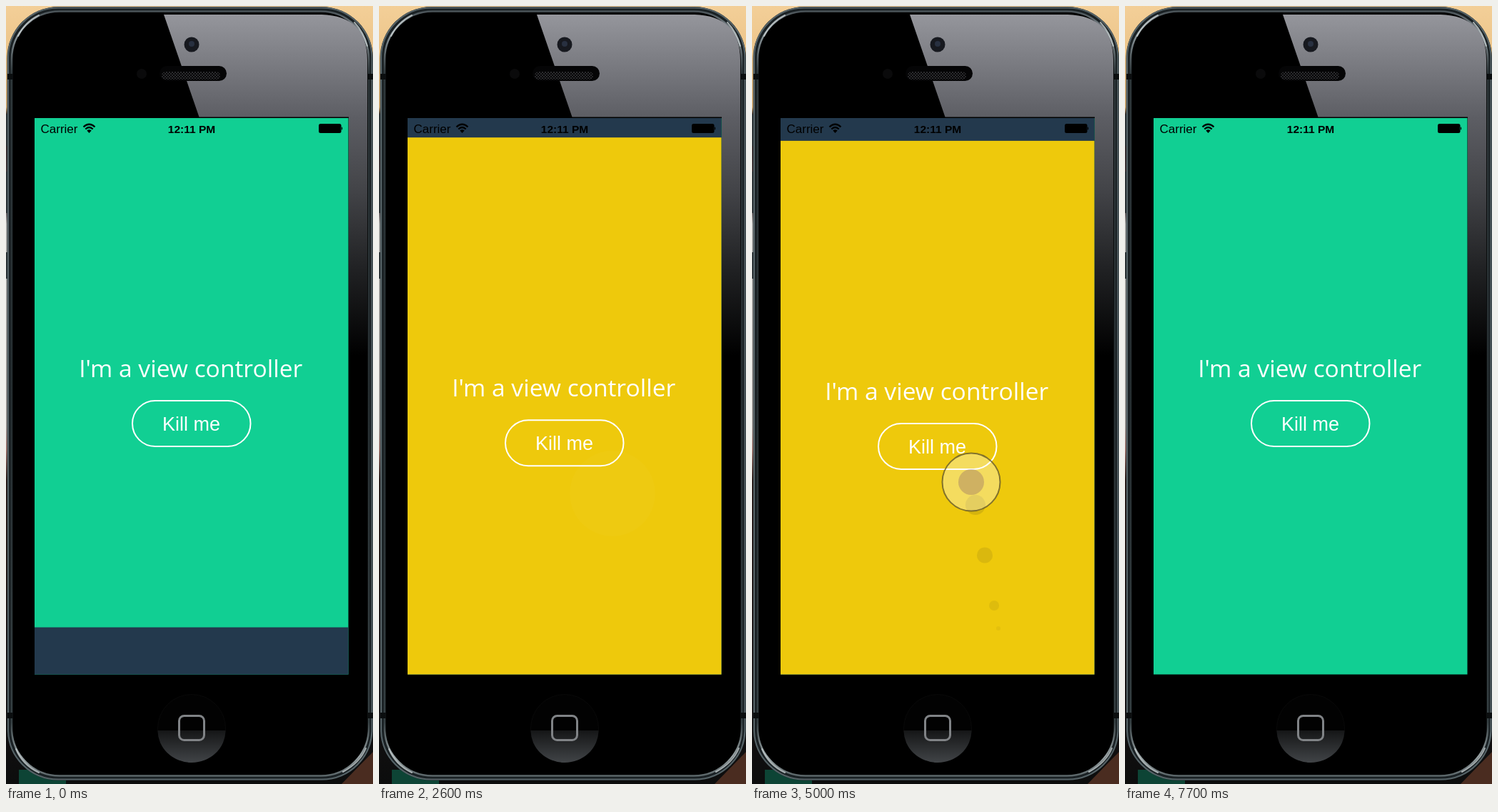
Animation, 514 px wide and 1090 px high, one loop 8 s. Source, as an HTML page:

```html
<!DOCTYPE html>
<html lang="en">
<head>
<meta charset="utf-8">
<title>Stacked view controllers</title>
<style>
  html, body { margin: 0; width: 100%; height: 100%; overflow: hidden; background: #000; }
  svg { display: block; }
  .title { font: 33.6px "Open Sans", sans-serif; fill: #fff; text-anchor: middle; }
  .label { font: 27px "Liberation Sans", Arial, sans-serif; fill: #fff; text-anchor: middle; }
  .status { font: 17px "Liberation Sans", Arial, sans-serif; }
  .clock { font-weight: bold; font-size: 15.5px; text-anchor: middle; }
</style>
</head>
<body>
<svg width="514" height="1090" viewBox="0 0 514 1090">
  <defs>
    <linearGradient id="backdrop" x2="0" y2="1">
      <stop offset="0" stop-color="#f3cf98"/><stop offset=".13" stop-color="#e4b878"/>
      <stop offset=".14" stop-color="#2c2526"/><stop offset=".26" stop-color="#57474a"/>
      <stop offset=".28" stop-color="#b9bab8"/><stop offset=".54" stop-color="#a9a5a2"/>
      <stop offset=".57" stop-color="#b08078"/><stop offset=".61" stop-color="#2a1b18"/>
      <stop offset=".9" stop-color="#141112"/><stop offset="1" stop-color="#0c0d0d"/>
    </linearGradient>
    <linearGradient id="glare" gradientUnits="userSpaceOnUse" x1="0" y1="12" x2="0" y2="490">
      <stop offset="0" stop-color="#95969c"/><stop offset=".3" stop-color="#5d5e64"/>
      <stop offset=".52" stop-color="#424347"/><stop offset=".75" stop-color="#202123"/>
      <stop offset="1" stop-color="#000"/>
    </linearGradient>
    <linearGradient id="rim" x2="0" y2="1">
      <stop offset="0" stop-color="#4a5358"/><stop offset=".03" stop-color="#8d979b"/>
      <stop offset=".08" stop-color="#2f383b"/><stop offset=".5" stop-color="#262e31"/>
      <stop offset=".93" stop-color="#364043"/><stop offset=".975" stop-color="#98a2a4"/>
      <stop offset="1" stop-color="#5a6568"/>
    </linearGradient>
    <linearGradient id="home" x2="0" y2="1">
      <stop offset="0" stop-color="#151617"/><stop offset="1" stop-color="#414447"/>
    </linearGradient>
    <pattern id="mesh" width="4" height="4" patternUnits="userSpaceOnUse">
      <path d="M0 0H2V2H0ZM2 2H4V4H2Z" fill="#2a2a2d"/>
    </pattern>
  </defs>

  <rect width="514" height="1090" fill="url(#backdrop)"/>
  <path d="M18 1070H84V1090H18Z" fill="#0d4435"/>
  <path d="M514 1045V1090H470Z" fill="#4a2c20"/>
  <path d="M0 152H4V196H0ZM0 232H4V290H0ZM0 345H4V382H0Z" fill="#30383b"/>

  <rect x="1.5" y="1" width="512.500" height="1084" rx="72" fill="#1a2124"/>
  <rect x="3" y="2.5" width="509.500" height="1081" rx="70" fill="none" stroke="#566367" stroke-width="2"/>
  <rect x="8" y="7.500" width="500" height="1071" rx="67" fill="#000" stroke="url(#rim)" stroke-width="2.500"/>
  <path d="M2 95H9V103H2ZM507 95H514V103H507ZM2 990H9V998H2ZM507 990H514V998H507Z" fill="#0b0e0f"/>
  <path d="M17 42Q26 23 46 13M488 23Q501 37 506 56M14 1041Q23 1063 46 1074M472 1073Q496 1060 504 1040"
        fill="none" stroke="#c5cccd" stroke-width="2" stroke-linecap="round" opacity=".8"/>

  <path d="M221 12H442Q506 14 506 76V490H479V157H271Z" fill="url(#glare)"/>
  <circle cx="260" cy="54" r="10.5" fill="#17191f"/>
  <circle cx="260" cy="53" r="4" fill="#283040"/>
  <circle cx="190" cy="95" r="7" fill="#0a0a0b"/>
  <rect x="215" y="84" width="94" height="21" rx="10.5" fill="#050506"/>
  <rect x="218" y="92" width="82" height="11" rx="5.500" fill="url(#mesh)"/>
  <circle cx="260" cy="1012" r="47.5" fill="#020202" stroke="#090909"/>
  <path d="M212.5 1015H307.5A47.5 45 0 0 1 212.5 1015Z" fill="url(#home)"/>
  <rect x="242.500" y="994.500" width="35" height="34" rx="7" fill="none" stroke="#808386" stroke-width="3"/>

  <rect x="39" y="155.500" width="441" height="781.500" fill="#000"/>
  <svg x="40" y="157" width="439.500" height="779.500" id="screen"></svg>

  <g class="status">
    <text x="48.500" y="178">Carrier</text>
    <text class="clock" x="260" y="177.500">12:11 PM</text>
    <path d="M108.500 169.500Q116.500 162 124.500 169.500M111.300 172.500Q116.500 167.500 121.700 172.500"
          fill="none" stroke="#000" stroke-width="2.300"/>
    <path d="M113.300 174.500Q116.500 172 119.700 174.500L116.500 178Z"/>
    <rect x="438" y="165" width="31.500" height="13" rx="2.500"/>
    <path d="M470 169Q472.500 171.500 470 174Z"/>
  </g>
  <g id="touches"></g>
</svg>

<script>
const LOOP = 8000, STEP = 100, PEEK = 713.5, GONE = 800;
const $ = id => document.getElementById(id);
const clamp = x => Math.max(0, Math.min(1, x));
const easeOut = p => 1 - (1 - p) ** 3;
const smooth = p => p * p * (3 - 2 * p);
const mix = (a, b, p) => a + (b - a) * p;

const sheet = (id, color, child = '') => `<g id="${id}">
  <rect width="440" height="780" fill="${color}"/>
  <text class="title" x="218.700" y="363">I'm a view controller</text>
  <rect x="137" y="396" width="165.500" height="64" rx="32" fill="none" stroke="#fff" stroke-width="2"/>
  <text class="label" x="219.500" y="438">Kill me</text>${child}</g>`;
$('screen').innerHTML =
  sheet('green', '#11cf93', sheet('blue', '#23394d', sheet('yellow', '#eec90c')));

// Each move: start, duration, offset to reach, easing. Offsets are relative to the parent sheet.
const moves = {
  blue: [[1047, 600, 0, easeOut], [7100, 400, GONE, smooth]],
  yellow: [[2202, 600, 0, easeOut], [3750, 450, PEEK, easeOut],
           [4780, 341, 0, easeOut], [6000, 500, PEEK, easeOut]]
};

// Each gesture: press, start of movement, release, start point, end point.
const gestures = [
  [980, 1047, 1310, 365, 890, 329, 585],
  [2060, 2120, 2330, 352, 895, 327, 683],
  [3640, 3700, 3950, 305, 300, 318, 530],
  [4690, 4780, 5000, 345, 872, 307, 667],
  [5890, 5950, 6200, 300, 300, 315, 530],
  [7000, 7000, 7100, 262, 588, 262, 588]
];

const offsetAt = (track, t) => track.reduce((y, [start, length, to, ease]) =>
  mix(y, to, ease(clamp((t - start) / length))), PEEK);

const dot = (x, y, r, attrs) => `<circle cx="${x}" cy="${y}" r="${r}" ${attrs}/>`;

function drawTouch([press, begin, release, x0, y0, x1, y1], t) {
  const fade = (t - release) / 300;
  if (t < press || fade >= 1) return '';
  const at = time => {
    const p = smooth(clamp((time - begin) / (release - begin)));
    return [mix(x0, x1, p), mix(y0, y1, p)];
  };
  const out = clamp(fade), held = 1 - clamp(fade * 4);
  let marks = '';
  if (held) {
    [14, 11, 7, 3].forEach((r, i) => {
      const time = t - 55 * (i + 1);
      if (time >= press) marks += dot(...at(time), r, `fill="#5a4c20" opacity="${(.17 - .035 * i) * held}"`);
    });
  }
  const [x, y] = at(t);
  marks += dot(x, y, 41 + 21 * out, `fill="#fff" opacity="${.34 * (1 - out) ** 1.2}"`);
  marks += dot(x, y, 40.5 + 21 * out, `fill="none" stroke="#5c5020" stroke-width="2" opacity="${.75 * held}"`);
  return marks + dot(x, y, 18, `fill="#967068" opacity="${.4 * held}"`);
}

function render(t) {
  for (const id in moves)
    $(id).setAttribute('transform', `translate(0 ${offsetAt(moves[id], t)})`);
  $('touches').innerHTML = gestures.map(g => drawTouch(g, t)).join('');
}

const origin = performance.now();
function tick() {
  const t = (performance.now() - origin) % LOOP;
  render(Math.floor(t / STEP) * STEP);
  requestAnimationFrame(tick);
}
tick();
</script>
</body>
</html>
```
